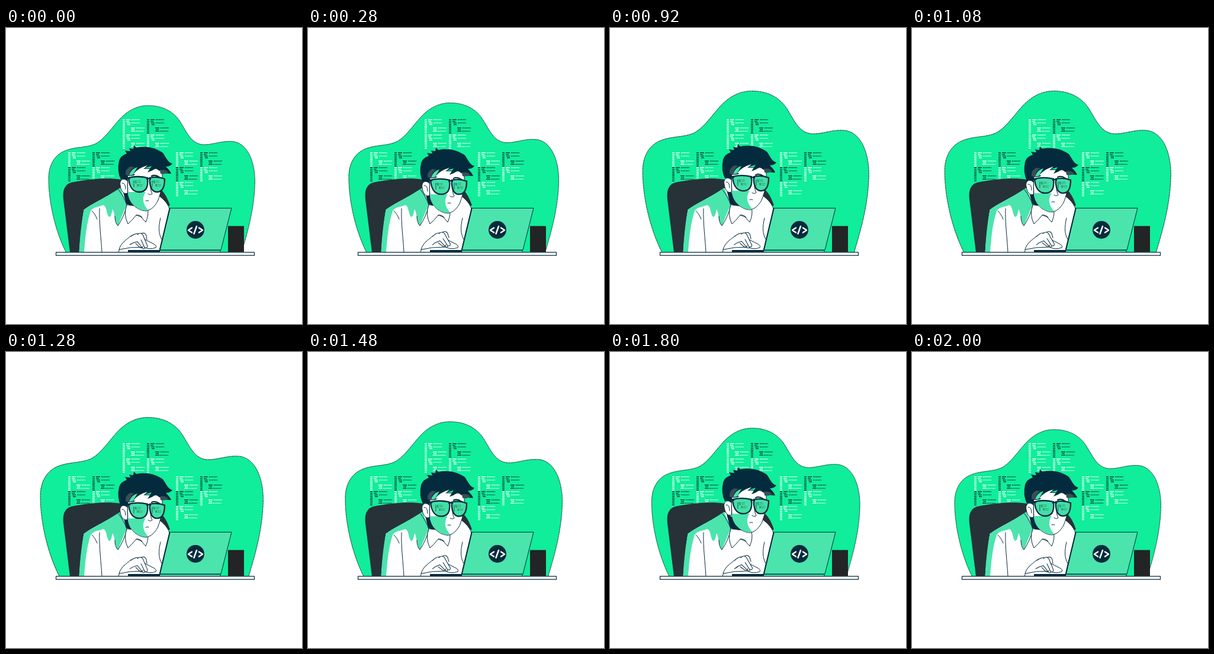
Write an HTML page that moves like this. It is 500x500 px and loops after 2040 ms.

```html
<!DOCTYPE html>
<html lang="en">
<head>
<meta charset="utf-8">
<title>Coder at a laptop</title>
<style>
  html, body { margin: 0; width: 100%; height: 100%; overflow: hidden; background: #fff; }
  svg { display: block; width: 100vw; height: 100vh; }
  path { stroke-linecap: round; stroke-linejoin: round; }
  .line { fill: none; stroke: #06283a; }
  .skin { fill: #fff; stroke: #06283a; }
  .navy { fill: #042b3d; }
  .mint { fill: #4be4ad; }
  .white { stroke: #e9fff6; }
  .dark { stroke: #17403a; }
  #code path { fill: none; stroke-width: 1.4; stroke-linecap: butt; }
</style>
</head>
<body>
<svg viewBox="0 0 500 500">
  <defs>
    <g id="code">
      <path d="M0 .8h4m2 0h7M0 3.600h4m2 0h5M0 6.400h4m3 0h6M0 9.200h4m4 0h5M0 12h4M0 14.800h4m10 0h7M0 17.600h4m11 0h5M0 20.400h4m10 0h7M0 23.200h4"/>
      <path stroke-dasharray="1.700 .9" d="M15 .8h14M15 6.400h14M23 14.800h14M22 20.400h14"/>
    </g>
  </defs>

  <path id="blob" fill="#10ed9b" stroke="#062c20" stroke-width=".8" stroke-dasharray="3 1.200"
    d="M103 382C86 350 72 300 72 254C72 234 80 217 96 209C114 200 134 203 150 196C164 190 176 172 192 154C206 139 222 131 240 131C262 131 280 139 292 155C306 176 312 196 334 197C350 197 362 191 380 191.500C406 192 420 222 420.500 258C420 305 408 345 397 382"/>

  <g id="blocks"></g>

  <!-- chair and cup -->
  <path fill="#263238" d="M108 379L97 290Q94 266 110 261C140 255 172 252 194 256L258 270Q270 278 277 300L205 310L130 379Z"/>
  <path fill="#222425" d="M375 334.500h27v44h-27Z"/>

  <!-- shirt -->
  <path class="skin" d="M123 379C125 350 128 325 131 307C143 297 165 288 193 270L250 279C264 285 273 296 276 305L272 379Z"/>
  <path class="mint" d="M123.500 379C125 350 128 325 131.500 307C145 297 166 288 193 270L204 298L189 334C183 325 184 313 180 306C178 314 178 319 174 319C169 314 171 301 164 299C156 303 148 301 143 309C136 331 134 352 132 379Z"/>
  <path class="line" d="M190 273Q200 286 204 299Q200 318 189 334Q184 329 184 318"/>
  <path class="navy" d="M196 270L207 280L236 300L219 304L203 297Z"/>
  <path class="skin" d="M204 299Q198 315 206 331Q212 326 220 316L228 319L236 328Q242 315 239 303Z"/>
  <path class="line" d="M158 305C157 330 161 357 162 379M145 309Q150 313 154 323M220 316Q226 315 230 320M261 321C257 338 258 348 263 357M190 379Q193 367 200 360"/>

  <!-- head -->
  <g id="head">
    <path class="skin" d="M205 237L263 238C266 256 263 276 256 293C250 303 244 308 236 309C222 308 209 297 206 282Z"/>
    <path class="mint" d="M206 277L236 277C228 288 233 300 240 307Q236 309 232 308C217 304 208 294 206 280Z"/>
    <path class="skin" d="M205 258C198 252 191 257 193 266C194 275 199 282 205 279Z"/>
    <path class="line" d="M196 262Q202 261 202 272M244 266Q244 275 247 280Q244 283 240 280M236 292Q239 291 241 292"/>
    <path class="navy" d="M194 256Q187 242 191 224Q194 215 204 212L201 207Q207 208 210 208L208 203Q213 204 215 204L216 198L220 202C239 198 256 204 265 211C271 219 273 227 281 229Q278 234 270 234Q278 242 279 246Q265 247 253 237Q246 242 239 244L246 233Q230 237 216 249Q211 250 206 250L205 259Q200 253 194 256Z"/>
    <path fill="#3b4d58" d="M202 248Q201 238 210 234L217 235Q208 240 208 250ZM260 240Q270 238 274 244Q267 248 261 246Z"/>
    <path class="mint" d="M208 249Q211 238 222 235Q218 242 214 248Z"/>
    <path fill="#fff" d="M215 247Q222 237 239 232Q230 241 221 247Z"/>
    <path class="line" stroke-width="2" d="M246 250Q252 247 259 252"/>
    <g fill="#42dfa7" stroke="#042b3d" stroke-width="2.300">
      <path d="M207 253Q222 249 239 253C241 271 235 277 225 277C213 277 208 266 207 253Z"/>
      <path d="M243 253Q256 250 268 255C268 270 263 277 255 277C246 277 242 267 243 253Z"/>
      <path fill="none" d="M204 252L209 254M238 255Q241 253 244 255"/>
    </g>
    <g class="dark">
      <use href="#code" transform="translate(215 258) scale(.44)"/>
      <use href="#code" transform="translate(246 258) scale(.44)"/>
    </g>
  </g>

  <!-- laptop -->
  <path class="navy" d="M206 375h56v5.500h-56Z"/>
  <path class="mint" stroke="#06283a" d="M260 375.500h102v4.500h-102Z"/>
  <path class="mint" stroke="#06283a" d="M277 304.300H381L363 375H260Z"/>
  <path class="line" stroke-width="2" d="M276.500 305L260 374"/>
  <circle class="navy" cx="320" cy="341" r="15"/>
  <path fill="none" stroke="#fff" stroke-width="2.500" d="M314 337.500L308 341.500L314 345.500M317.500 347.500L322 335M326 337.500L332 341.500L326 345.500"/>

  <!-- typing hand -->
  <path class="skin" d="M191 374C194 363 203 358 210 352Q217 347 225 349L236 358L250 365Q255 368 253 371Q242 375 232 370L210 371Z"/>
  <g id="fingers">
    <path class="skin" d="M211 352Q219 346 225 348Q229 356 234 370Q235 374 231 373L222 361Q215 362 209 366"/>
    <path class="skin" d="M222 349Q227 345 231 349L239 369Q238 373 234 371L228 358"/>
    <path class="line" d="M219 364L226 371Q230 373 231 369M229 347Q235 345 237 351L238 358"/>
  </g>

  <path fill="#fff" stroke="#06283a" stroke-width="1.200" d="M84.500 378.800H419.500V384.200H84.500Z"/>
</svg>
<script>
  const $ = id => document.getElementById(id);
  const LOOP = 2040, CYCLE = 2000, STEP = 40, TAU = Math.PI * 2;

  const blocks = [
    [105, 210, "white"], [105, 235, "dark"], [146, 210, "dark"], [146, 235, "white"],
    [197, 154, "white"], [197, 180, "white"], [238, 154, "dark"], [238, 180, "white"],
    [287, 210, "white"], [287, 235, "dark"], [287, 260, "white"],
    [328, 210, "dark"], [328, 235, "white"]
  ];
  $("blocks").innerHTML = blocks.map(([x, y, tone]) =>
    `<use href="#code" x="${x}" y="${y}" class="${tone}"/>`).join("");

  function draw(now) {
    const t = Math.floor(now % LOOP / STEP) * STEP;
    const pulse = 1 + 0.049 * (1 - Math.cos(TAU * t / CYCLE));
    const nod = 4 * Math.sin(TAU * t / 1000);
    const tap = 0.5 - 0.5 * Math.cos(TAU * (t / 400 - 0.08));

    $("blob").setAttribute("transform", `translate(246 386) scale(${pulse}) translate(-246 -386)`);
    $("head").setAttribute("transform", `translate(0 ${nod})`);
    $("fingers").setAttribute("transform", `rotate(${-9 * tap} 211 356)`);
    requestAnimationFrame(() => draw(performance.now()));
  }
  draw(0);
</script>
</body>
</html>
```
